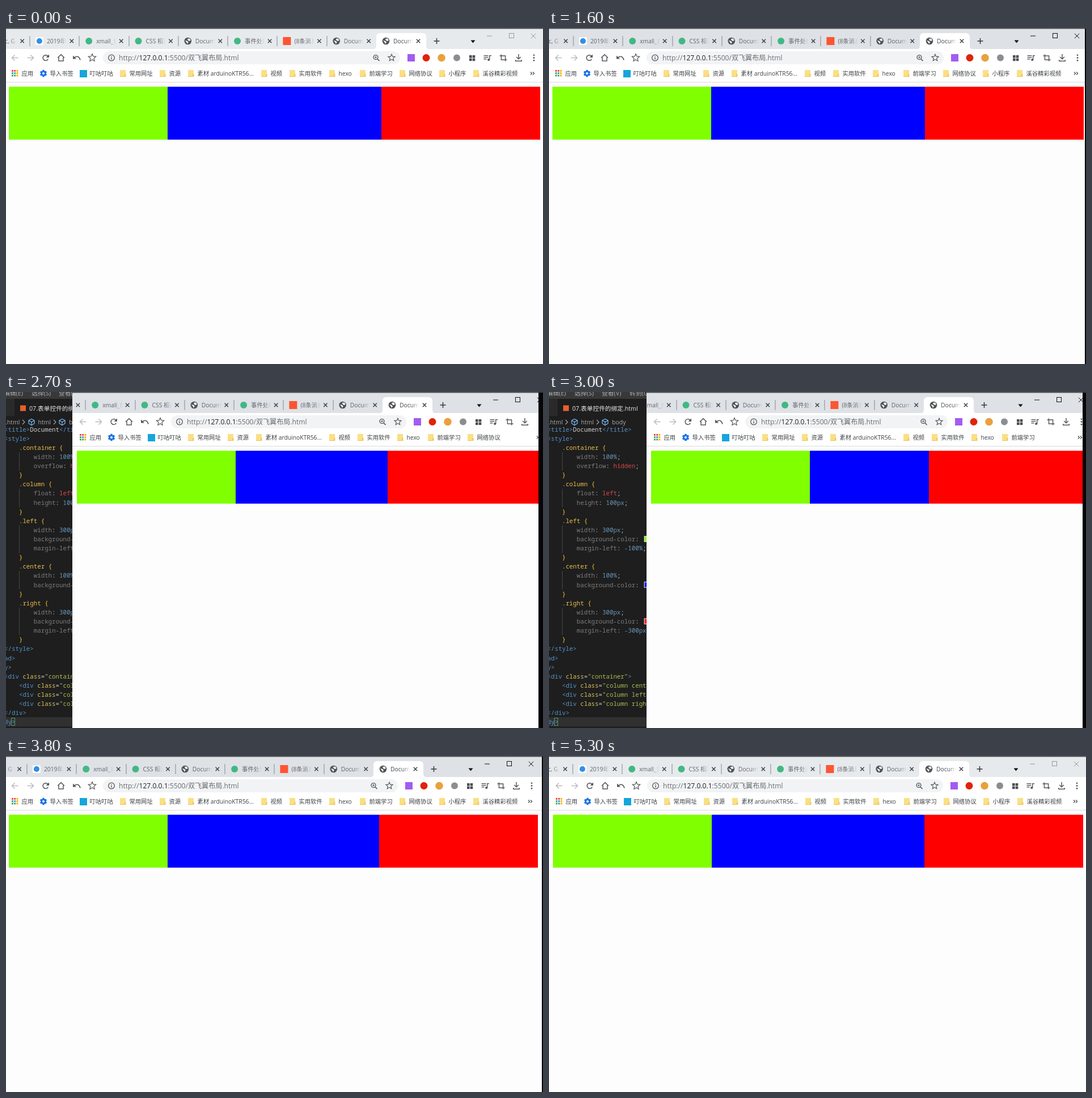
Recreate the animation shown at these times as an HTML page with a canvas. Size 947x592 px, loop 5.4 s.

```html
<!DOCTYPE html>
<html lang="zh-CN">
<head>
<meta charset="utf-8">
<title>Layout</title>
<style>
html, body { margin: 0; width: 100%; height: 100%; overflow: hidden; background: #000; }
canvas { display: block; }
</style>
</head>
<body>
<canvas id="stage" width="947" height="592"></canvas>
<script>
const W = 947, H = 592, LOOP = 5400, STEP = 100;
const ctx = document.getElementById('stage').getContext('2d');
const UI = '"Open Sans", "Noto Sans CJK SC", "Noto Sans CJK", sans-serif';
const MONO = '"Noto Sans Mono", "DejaVu Sans Mono", monospace';
const GREY = '#55585c';

// time, window left, layout right, visible right
const KEYS = [
  [0, -3, 942, 960], [1500, -3, 942, 960], [1600, -2, 943, 945], [1800, 2, 943, 942],
  [2100, 16, 943, 934], [2200, 32, 943, 932], [2700, 117, 953, 939], [3000, 172, 950, 941],
  [3200, 204, 946, 944], [3300, 206, 942, 947], [3400, 187, 939, 947], [3500, 140, 938, 947],
  [3600, 78, 937, 946], [3700, 18, 937, 945], [3800, -3, 937.6, 945], [4000, -3, 938.6, 945],
  [4300, -1, 942, 960], [LOOP, -1, 942, 960]
];

function pose(t) {
  const i = Math.max(1, KEYS.findIndex(k => k[0] >= t));
  const a = KEYS[i - 1], b = KEYS[i], p = (t - a[0]) / (b[0] - a[0]);
  const mix = n => a[n] + (b[n] - a[n]) * p;
  return { left: Math.round(mix(1)), right: mix(2), edge: Math.round(mix(3)) };
}

function rect(x, y, w, h, color) {
  ctx.fillStyle = color;
  ctx.fillRect(x, y, w, h);
}

function disc(x, y, r, color) {
  ctx.fillStyle = color;
  ctx.beginPath();
  ctx.arc(x, y, r, 0, Math.PI * 2);
  ctx.fill();
}

function path(pts, color, width = 1.4, close = false) {
  ctx.strokeStyle = color;
  ctx.lineWidth = width;
  ctx.beginPath();
  pts.forEach(([x, y]) => ctx.lineTo(x, y));
  if (close) ctx.closePath();
  ctx.stroke();
}

function arc(x, y, r, from, to, color, width = 1.4) {
  ctx.strokeStyle = color;
  ctx.lineWidth = width;
  ctx.beginPath();
  ctx.arc(x, y, r, from, to);
  ctx.stroke();
}

function fillPoly(pts, color) {
  ctx.fillStyle = color;
  ctx.beginPath();
  pts.forEach(([x, y]) => ctx.lineTo(x, y));
  ctx.fill();
}

function round(x, y, w, h, r, color) {
  ctx.fillStyle = color;
  ctx.beginPath();
  ctx.roundRect(x, y, w, h, r);
  ctx.fill();
}

function text(str, x, y, size, color, family = UI) {
  ctx.font = size + 'px ' + family;
  ctx.fillStyle = color;
  ctx.fillText(str, x, y);
}

function cross(x, y, r, color, width) {
  path([[x - r, y - r], [x + r, y + r]], color, width);
  path([[x + r, y - r], [x - r, y + r]], color, width);
}

function star(x, y, r, color) {
  const pts = [];
  for (let i = 0; i < 10; i++) {
    const a = i * Math.PI / 5 - Math.PI / 2, d = i % 2 ? r * 0.45 : r;
    pts.push([x + d * Math.cos(a), y + d * Math.sin(a)]);
  }
  path(pts, color, 1.2, true);
}

/* ---------- editor ---------- */
const CODE = [
  [1, '<title>Document</title>'], [1, '<style>'],
  [2, '.container {'], [3, 'width: 100%;'], [3, 'overflow: hidden;'], [2, '}'],
  [2, '.column {'], [3, 'float: left;'], [3, 'height: 100px;'], [2, '}'],
  [2, '.left {'], [3, 'width: 300px;'], [3, 'background-color: chartreuse;'],
  [3, 'margin-left: -100%;'], [2, '}'],
  [2, '.center {'], [3, 'width: 100%;'], [3, 'background-color: blue;'], [2, '}'],
  [2, '.right {'], [3, 'width: 300px;'], [3, 'background-color: red;'],
  [3, 'margin-left: -300px;'], [2, '}'],
  [1, '</style>'], [0, '</head>'], [0, '<body>'],
  [1, '<div class="container">'], [2, '<div class="column center"></div>'],
  [2, '<div class="column left"></div>'], [2, '<div class="column right"></div>'],
  [1, '</div>'], [0, '</body>']
];
const CELL = 6.465, ROW = 16.117;

const HTML_RULES = [
  [/^<\/?\w+|^>/, '#5592c8'], [/^\w+(?==")/, '#d9c25a'], [/^"[^"]*"/, '#a9bd55'], [/^[^<>"]/, '#cccccc']
];
const CSS_RULES = [
  [/^\.\w+/, '#e9bd4b'], [/^[{}]/, '#ffc432'], [/^[\w-]+(?=:)/, '#7c7c7c'],
  [/^-?\d+(px|%)/, '#6897bb'], [/^[a-z]+/, '#d8474d'], [/^./, '#bbbbbb']
];

function codeLine(indent, src, y) {
  const rules = src[0] === '<' ? HTML_RULES : CSS_RULES;
  const swatch = (src.match(/color: (\w+)/) || [])[1];
  let x = -28.8 + indent * 4 * CELL;
  while (src) {
    const [re, color] = rules.find(r => r[0].test(src));
    const word = src.match(re)[0];
    if (word === swatch) {
      rect(x + 2.5, y - 5.5, 10.5, 10.5, '#eee');
      rect(x + 3.5, y - 4.5, 8.5, 8.5, swatch);
      x += 15.5;
    }
    text(word, x, y + 3.8, 10.77, color, MONO);
    x += word.length * CELL;
    src = src.slice(word.length);
  }
}

function cube(x, y) {
  const c = '#75beff';
  path([[x, y - 5.5], [x + 5, y - 3], [x + 5, y + 2.5], [x, y + 5.5], [x - 5, y + 2.5], [x - 5, y - 3]], c, 1.2, true);
  path([[x - 5, y - 3], [x, y], [x + 5, y - 3]], c, 1.1);
  path([[x, y], [x, y + 5.5]], c, 1.1);
}

function editor() {
  rect(0, 0, W, H, '#1e1e1e');
  rect(0, 573, W, 16.5, '#303030');
  CODE.forEach(([indent, src], i) => {
    const y = 65.8 + i * ROW;
    if (indent === 3) rect(23, y - 8, 1, ROW, '#484848');
    codeLine(indent, src, y);
  });
  ctx.strokeStyle = '#4f9a62';
  ctx.lineWidth = 1;
  ctx.strokeRect(9.5, 574.5, 6, 13);

  rect(0, 42, W, 20, '#1e1e1e');
  const crumb = '#a9a9a9';
  text('.html', -1, 57, 10.5, crumb);
  text('html', 56.5, 57, 10.5, crumb);
  text('body', 111, 57, 10.5, crumb);
  [31, 86].forEach(x => path([[x - 2, 49], [x + 2, 53], [x - 2, 57]], crumb, 1.1));
  cube(45, 53);
  cube(99, 53);

  rect(0, 0, W, 12, '#383838');
  rect(0, 12, W, 30, '#2a2a2a');
  rect(15, 12, 167, 30, '#1e1e1e');
  rect(25, 23.5, 10, 10, '#e8602c');
  text('07.表单控件的绑定.html', 41, 33, 10.7, '#e8e8e8');
  [['编辑(E)', -4], ['选择(S)', 45], ['查看(V)', 93], ['转到(G)', 142]]
    .forEach(([s, x]) => text(s, x, 5.5, 10.8, '#b0b0b0'));
}

/* ---------- browser ---------- */
const TAB = 87.3;
const TABS = [
  ['none', 'Doc, G'], ['cloud', '2019年终'], ['leaf', 'xmall_前端'], ['leaf', 'CSS 相对'], ['globe', 'Document'],
  ['leaf', '事件处理'], ['box', '(8条消息)'], ['globe', 'Document'], ['globe', 'Document']
];
const FAVICON = {
  none() {},
  cloud(x, y) { round(x - 7, y - 7, 14, 14, 2, '#fff'); disc(x, y, 5, '#2f8fe8'); },
  leaf(x, y) { disc(x, y, 6, '#41b883'); },
  box(x, y) { rect(x - 7, y - 7, 14, 14, '#fc5531'); },
  globe(x, y) {
    disc(x, y, 6.3, '#505458');
    fillPoly([[x - 5, y - 1], [x - 1, y], [x + 1, y + 2], [x - 1, y + 5], [x - 2, y + 2.5]], '#fff');
    fillPoly([[x - 1, y - 4], [x + 3, y - 4.5], [x + 5, y - 1], [x + 2, y], [x, y - 1.5]], '#fff');
  }
};

function tab(x, icon, title, active) {
  if (active) {
    ctx.fillStyle = '#fff';
    ctx.beginPath();
    ctx.moveTo(x - 7, 38);
    ctx.quadraticCurveTo(x, 38, x, 31);
    ctx.lineTo(x, 16);
    ctx.quadraticCurveTo(x, 9, x + 7, 9);
    ctx.lineTo(x + 81, 9);
    ctx.quadraticCurveTo(x + 88, 9, x + 88, 16);
    ctx.lineTo(x + 88, 31);
    ctx.quadraticCurveTo(x + 88, 38, x + 95, 38);
    ctx.fill();
  } else {
    rect(Math.round(x) - 0.5, 14, 1, 18, '#84878b');
  }
  FAVICON[icon](x + 17, 23);
  const fade = ctx.createLinearGradient(x + 52, 0, x + 65, 0);
  fade.addColorStop(0, active ? '#45494d' : '#5f6368');
  fade.addColorStop(1, 'rgba(95,99,104,0)');
  text(title, x + 30, 27, 10.3, fade);
  cross(x + 74, 23, 3.2, '#3f4246', 1.5);
}

function tabStrip(right, active, t) {
  const first = Math.round(right - 289.4) - TAB * 8;
  TABS.forEach(([icon, title], i) => tab(first + i * TAB, icon, title, i === 8));
  const px = first + TAB * 8 + 106.5;
  rect(px - 5, 22.2, 10, 1.6, '#3c4043');
  rect(px - 0.8, 18, 1.6, 10, '#3c4043');
  const r = Math.round(right);
  fillPoly([[r - 122.5, 21.5], [r - 114.5, 21.5], [r - 118.5, 26.5]], '#111');

  const hotMax = t >= 4700 && t < 4900, hotClose = t >= 4800 && t < 5100;
  if (hotMax) rect(r - 70, 2, 39, 24, t < 4800 ? '#c8cbcf' : '#d5d8dd');
  if (hotClose) rect(r - 31, 2, 40, 24, t < 4900 ? '#e56b75' : '#e81123');
  const c = active ? '#111' : '#96999c';
  rect(r - 94, 13.5, 9, 1, c);
  ctx.strokeStyle = c;
  ctx.lineWidth = 1;
  ctx.strokeRect(r - 54.5, 9.5, 8, 8);
  cross(r - 12, 14, 4.2, hotClose ? '#fff' : c, 1);
}

function arrow(x, y, dir, color) {
  path([[x - 5.5, y], [x + 5.5, y]], color);
  path([[x + dir * 0.5, y - 5], [x + dir * 5.5, y], [x + dir * 0.5, y + 5]], color);
}

function toolbar(l, r) {
  const y = 52.5;
  rect(l, 37, W - l + 20, 59, '#fff');
  arrow(l + 19, y, -1, '#b5b7b9');
  arrow(l + 46, y, 1, '#b5b7b9');
  arc(l + 73, y, 4.8, 0.5, 5.6, GREY, 1.6);
  fillPoly([[l + 79, 46.5], [l + 79, 52], [l + 73.5, 52]], GREY);
  const hx = l + 100;
  path([[hx - 6, y], [hx, y - 5.6], [hx + 6, y]], GREY, 1.5);
  path([[hx - 4, y - 1], [hx - 4, y + 5.4], [hx + 4, y + 5.4], [hx + 4, y - 1]], GREY, 1.5);
  const ux = l + 128;
  ctx.beginPath();
  ctx.moveTo(ux - 5, y);
  ctx.quadraticCurveTo(ux + 3, y - 6, ux + 6, y + 4);
  ctx.lineWidth = 1.7;
  ctx.strokeStyle = GREY;
  ctx.stroke();
  fillPoly([[ux - 7, y - 4], [ux - 7, y + 2], [ux - 1, y + 2]], GREY);
  star(l + 155, y, 7, GREY);

  round(l + 174, 41, r - 247 - l - 174, 23, 11.5, '#f1f3f4');
  arc(l + 189, y, 5.3, 0, 7, GREY, 1.3);
  rect(l + 188.3, y - 0.6, 1.4, 3.6, GREY);
  rect(l + 188.3, y - 3, 1.4, 1.4, GREY);
  let x = l + 202;
  [['http://', '#6a6e72'], ['127.0.0.1', '#202124'], [':5500/双飞翼布局.html', '#6a6e72']].forEach(([s, c]) => {
    text(s, x, 57, 12.1, c);
    x += ctx.measureText(s).width;
  });

  const zx = r - 290;
  arc(zx, 51.5, 3.9, 0, 7, GREY);
  path([[zx + 3, 54.5], [zx + 6.5, 58]], GREY, 1.7);
  rect(zx - 2, 51, 4, 1, GREY);
  rect(zx - 0.5, 49.5, 1, 4, GREY);
  star(r - 262, y, 6.3, GREY);

  rect(r - 234, 46, 13, 13, '#a35cf0');
  disc(r - 201, y, 6.5, '#e0230b');
  disc(r - 174, y, 6.8, '#e8a13c');
  disc(r - 147, y, 6, '#8b8d90');
  [[-125, 48], [-119.3, 48], [-125, 53.5], [-119.3, 53.5]].forEach(([dx, top]) => rect(r + dx, top, 4.6, 4.6, '#4a4d51'));
  const mx = r - 93;
  [48, 51, 54].forEach((top, i) => rect(mx - 6.5, top, i === 2 ? 5 : 8, 1.4, GREY));
  rect(mx + 3, 48, 1.4, 8, GREY);
  rect(mx + 3, 48, 4, 1.4, GREY);
  disc(mx + 2.2, 56, 2.1, GREY);
  const cx = r - 65;
  path([[cx - 3.6, 46.5], [cx - 3.6, 56], [cx + 6.5, 56]], GREY, 1.5);
  path([[cx - 6.5, 49], [cx + 3.6, 49], [cx + 3.6, 58.5]], GREY, 1.5);
  const dx = r - 38;
  path([[dx, 46], [dx, 54]], GREY, 1.5);
  path([[dx - 3.8, 51], [dx, 54.8], [dx + 3.8, 51]], GREY, 1.5);
  path([[dx - 5.3, 56], [dx - 5.3, 58.3], [dx + 5.3, 58.3], [dx + 5.3, 56]], GREY, 1.4);
  [47.8, 52.5, 57.2].forEach(cy => disc(r - 11, cy, 1.4, GREY));
}

const MARKS = [
  ['apps', 13, '应用'], ['gear', 63, '导入书签'], ['video', 133, '叮咕叮咕'],
  ['folder', 204, '常用网址'], ['folder', 274, '资源'], ['folder', 324, '素材 arduinoKTR56...'],
  ['folder', 453, '视频'], ['folder', 503, '实用软件'], ['folder', 573, 'hexo'], ['folder', 627, '前端学习'],
  ['folder', 697, '网络协议'], ['folder', 767, '小程序'], ['folder', 827, '溪谷精彩视频']
];
const MARK_ICON = {
  apps(x) {
    const colors = ['#ea4335', '#ea4335', '#f9ab00', '#34a853', '#4285f4', '#f9ab00', '#34a853', '#34a853', '#f9ab00'];
    colors.forEach((c, i) => rect(x + i % 3 * 4.2, 74 + Math.floor(i / 3) * 4.2, 2.9, 2.9, c));
  },
  gear(x) {
    for (let i = 0; i < 6; i++) {
      const a = i * Math.PI / 3 + Math.PI / 6;
      path([[x + 6, 80], [x + 6 + 6.2 * Math.cos(a), 80 + 6.2 * Math.sin(a)]], '#1a73e8', 3.4);
    }
    disc(x + 6, 80, 4.8, '#1a73e8');
    disc(x + 6, 80, 2, '#fff');
  },
  video(x) { rect(x, 74, 13, 13, '#16a5dc'); },
  folder(x) {
    rect(x, 74, 10, 12, '#fbdf83');
    rect(x, 85, 10, 1, '#e6c35d');
    rect(x + 8, 81, 2.5, 5, '#edc964');
  }
};

function bookmarks(l, r) {
  for (const [icon, x, label] of MARKS) {
    const tx = l + x + (icon === 'folder' ? 16.5 : 17.5);
    ctx.font = '10.3px ' + UI;
    if (tx + ctx.measureText(label).width > r - 31) break;
    MARK_ICON[icon](l + x);
    text(label, tx, 84, 10.3, '#3c4043');
  }
  [r - 17, r - 13].forEach(x => path([[x, 77.5], [x + 2.5, 80], [x, 82.5]], '#45484c', 1.2));
}

function page(l, r) {
  rect(l, 96, W - l + 20, H - 96, '#fdfdfd');
  rect(l, 95, W - l + 20, 1, '#d9dbde');
  const band = (a, b, c) => rect(a, 103.5, b - a, 93.2, c);
  band(l + 8, l + 288, '#7fff00');
  band(l + 288, r - 280, '#0000ff');
  band(r - 280, r, '#ff0000');
}

function draw(t) {
  const { left, right, edge } = pose(t);
  const r = Math.round(right), active = t >= 1600 && t < 5300;
  editor();
  ctx.save();
  ctx.beginPath();
  ctx.rect(left, 0, W - left, H);
  ctx.clip();
  rect(left, 0, W - left, 2, '#4a4a4a');
  rect(left, 1.5, W - left, 36, active ? '#dee1e6' : '#e7eaed');
  toolbar(left, r);
  tabStrip(right, active, t);
  bookmarks(left, r);
  page(left, r);
  ctx.restore();
  if (edge < W) rect(edge, 1, W - edge, H, '#050505');
}

function tick(now) {
  const t = now % LOOP;
  draw(Math.floor(t / STEP) * STEP);
  requestAnimationFrame(tick);
}
requestAnimationFrame(tick);
</script>
</body>
</html>
```
